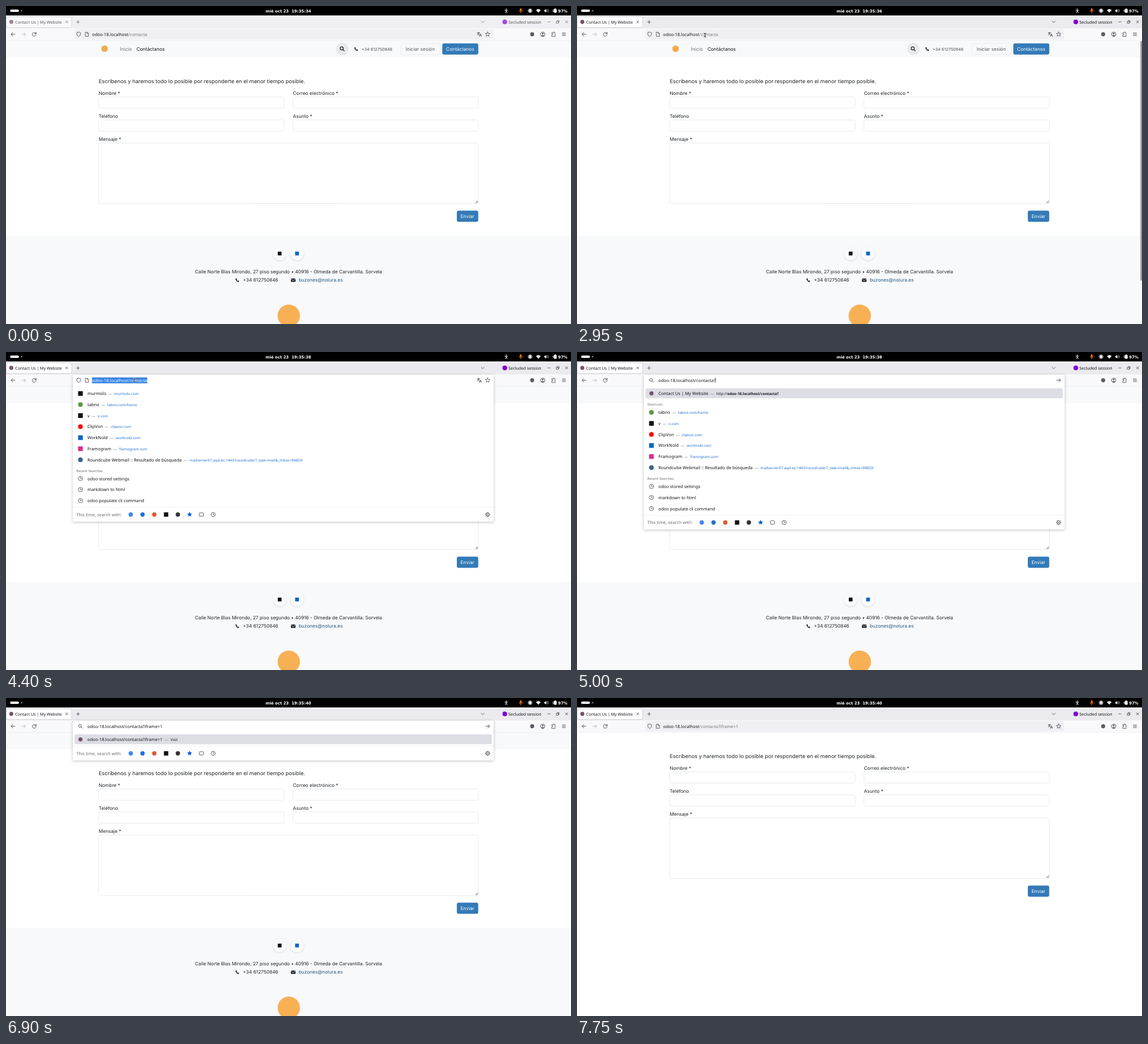
Recreate the animation shown at these times as an HTML page with a canvas. Size 960 px wide and 540 px high, loop 8000 ms.

```html
<!DOCTYPE html>
<html lang="es">
<head>
<meta charset="utf-8">
<title>Contact Us | My Website</title>
<style>
html, body { margin: 0; width: 960px; height: 540px; overflow: hidden; background: #fff; }
canvas { display: block; width: 960px; height: 540px; }
</style>
</head>
<body>
<canvas id="stage"></canvas>
<script>
const LOOP = 8000, W = 960, H = 540;
const cv = document.getElementById('stage');
const scale = Math.max(1, window.devicePixelRatio || 1);
cv.width = W * scale;
cv.height = H * scale;
const c = cv.getContext('2d');

const WEB = 'Inter, sans-serif', UI = '"Noto Sans", sans-serif', BAR = '"DejaVu Sans", sans-serif';
const INK = '#15141a', ICON = '#45444e', BODY = '#212529', BLUE = '#337ab7', LINK = '#1f70cf';
const HOST = 'odoo-18.localhost', PATH = '/contacta', QUERY = '?iframe=1';
const PHONE = '+34 612750846';

// times of the steps
const FOCUS = 950, OPEN = 3450, SELECT = 3550, CLOSE = 4550, TYPE = 5000, SHRINK = 5150, ENTER = 7250, LOADED = 7450;
const KEYS = [TYPE, SHRINK, 5450, 5650, 5800, 6000, 6150, 6400, 6750];
const MOVES = [[950, 958, 300], [1650, 199.5, 37], [1850, 199.5, 37], [2250, 211, 47],
  [2700, 211, 47], [2950, 217.5, 49.5], [3100, 218, 48.2]];

const SITES = [
  ['murmolo', 'murmolo.com', '#111', 1], ['tabno', 'tabno.com/home', '#5d9948'],
  ['v', 'x.com', '#111', 1], ['ClipVon', 'clipvon.com', '#f00'],
  ['WorkNold', 'worknold.com', '#0a66c2', 1], ['Framogram', 'framogram.com', '#d6308f', 1],
  ['Roundcube Webmail :: Resultado de búsqueda',
    'mailserver07.aspl.es:1443/roundcube/?_task=mail&_mbox=INBOX', '#37648a']];
const RECENT = ['odoo stored settings', 'markdown to html', 'odoo populate cli command'];

function text(s, x, y, size, color = INK, font = UI, weight = 400, align = 'left') {
  c.font = `${weight} ${size}px ${font}`;
  c.textAlign = align;
  c.fillStyle = color;
  c.fillText(s, x, y);
  return x + c.measureText(s).width;
}
function rect(x, y, w, h, color) {
  c.fillStyle = color;
  c.fillRect(x, y, w, h);
}
function box(x, y, w, h, r, fill, line, lw = 0.6) {
  c.beginPath();
  c.roundRect(x, y, w, h, r);
  if (fill) { c.fillStyle = fill; c.fill(); }
  if (line) { c.strokeStyle = line; c.lineWidth = lw; c.stroke(); }
}
function disc(x, y, r, fill, line, lw = 0.9) {
  c.beginPath();
  c.arc(x, y, r, 0, 7);
  if (fill) { c.fillStyle = fill; c.fill(); }
  if (line) { c.strokeStyle = line; c.lineWidth = lw; c.stroke(); }
}
// strokes or fills an SVG path around a point
function icon(x, y, d, color = ICON, lw = 0.9, fill = false) {
  c.save();
  c.translate(x, y);
  const p = new Path2D(d);
  c.lineCap = c.lineJoin = 'round';
  c.lineWidth = lw;
  c.strokeStyle = c.fillStyle = color;
  if (fill) c.fill(p); else c.stroke(p);
  c.restore();
}
function shadow(color, blur, dy, draw) {
  c.save();
  c.shadowColor = color;
  c.shadowBlur = blur * scale;
  c.shadowOffsetY = dy * scale;
  draw();
  c.restore();
}
const mark = (x, y, color, square, r = 4) =>
  square ? rect(x - r, y - r, 2 * r, 2 * r, color) : disc(x, y, r, color);
const lens = (x, y, k, color, lw) => {
  disc(x - 0.7 * k, y - 0.7 * k, 2.4 * k, null, color, lw);
  icon(x, y, `M${k} ${k}L${3.2 * k} ${3.2 * k}`, color, lw);
};
const clock = (x, y) => {
  disc(x, y, 3.6, null, ICON, 0.8);
  icon(x, y, 'M0 -2V0.2H1.6', ICON, 0.8);
};
const star = (x, y, r, color, fill) => {
  let d = '';
  for (let i = 0; i < 10; i++) {
    const a = i * Math.PI / 5 - Math.PI / 2, q = i % 2 ? r * 0.48 : r;
    d += (i ? 'L' : 'M') + Math.cos(a) * q + ' ' + Math.sin(a) * q;
  }
  icon(x, y, d + 'Z', color, 0.8, fill);
};
const gear = (x, y, r, color) => {
  disc(x, y, r * 0.72, null, color, 0.9);
  disc(x, y, r * 0.25, null, color, 0.7);
  for (let i = 0; i < 8; i++) {
    const a = i * Math.PI / 4, u = Math.cos(a), v = Math.sin(a);
    icon(x, y, `M${u * r * 0.8} ${v * r * 0.8}L${u * r} ${v * r}`, color, 0.9);
  }
};
const handset = (x, y) =>
  icon(x, y, 'M-3 -2.4L-1.6 -3.2L-.5 -1.2L-1.2 -.5Q-.6 .7 .5 1.2L1.2 .5L3.2 1.6L2.4 3Q.8 3.6 -1.4 1.4Q-3.6 -.8 -3 -2.4Z', BODY, 1, true);

function topBar(t) {
  rect(0, 0, W, 16, '#000');
  box(7, 6, 15, 4, 2, '#fff');
  disc(26.5, 8, 1.3, '#8a8a8a');
  const sec = 34 + Math.floor((t + 600) / 1250);
  text('mié oct 23  19:35:' + sec, 441, 10.5, 6.7, '#fff', BAR, 700);
  disc(850, 5.4, 0.9, '#fff');
  icon(850, 8, 'M-2.4 -.9L0 -.4L2.4 -.9M0 -.4V1M-1.4 3.4L0 .8L1.4 3.4', '#fff', 0.9);
  box(873.2, 4, 2.8, 5, 1.4, '#ff7800');
  icon(874.6, 8, 'M-2.4 -.5Q-2.4 2.2 0 2.2Q2.4 2.2 2.4 -.5M0 2.2V3.8', '#ff7800', 0.8);
  disc(879, 8, 0.6, '#ff7800');
  disc(890.5, 8, 1.9, '#fff');
  gear(890.5, 8, 3.7, '#fff');
  icon(904.5, 8, 'M0 3.3L-4 -1Q0 -4.6 4 -1Z', '#fff', 1, true);
  icon(918, 8, 'M-3.5 -1.2H-2L0 -3V3L-2 1.2H-3.5Z', '#fff', 1, true);
  icon(918, 8, 'M1.3 -1.4Q2.2 0 1.3 1.4M2.8 -2.6Q4.5 0 2.8 2.6', '#bbb', 0.8);
  box(931, 5, 4.6, 6.6, 0.8, '#fff');
  rect(932.3, 4.2, 2, 1, '#fff');
  icon(930, 8, 'M0 -2L-1 .3H.6L-.4 2.4', '#fff', 0.8);
  text('97%', 938, 10.5, 6.7, '#fff', BAR, 700);
}

function tabStrip(active) {
  rect(0, 16, W, 22, active ? '#ebebef' : '#f0f0f4');
  shadow('rgba(0,0,0,.3)', 2, 0, () => box(1, 18.5, 110, 17.5, 2, active ? '#fff' : '#f9f9fb'));
  c.globalAlpha = active ? 1 : 0.7;
  disc(9, 27, 3.4, '#75526a');
  text('Contact Us | My Website', 15.6, 29.7, 6.85);
  const x = 'M-1.9 -1.9L1.9 1.9M1.9 -1.9L-1.9 1.9';
  icon(103.2, 27, x, ICON, 0.8);
  icon(122.4, 27.2, 'M-2.8 0H2.8M0 -2.8V2.8', ICON, 0.8);
  icon(810, 27, 'M-2.7 -1.2L0 1.4L2.7 -1.2', ICON, 0.8);
  disc(847.5, 27, 4, '#8000d7');
  text('Secluded session', 853.5, 29.5, 7);
  icon(922.5, 27, 'M-2.2 0H2.2', ICON, 0.8);
  icon(937.5, 27, 'M-2.2 -.9H1V2.3H-2.2ZM-1 -.9V-2.2H2.3V1H1', ICON, 0.8);
  icon(952.5, 27, x, ICON, 0.9);
  c.globalAlpha = 1;
}

function toolbar() {
  rect(0, 38, W, 20.5, '#f9f9fb');
  rect(0, 58, W, 0.5, '#e4e4e8');
  const back = 'M3.3 0H-3.3M-.4 -2.9L-3.3 0L-.4 2.9';
  icon(12, 48, back);
  icon(30, 48, 'M-3.3 0H3.3M.4 -2.9L3.3 0L.4 2.9', '#b9b9c0');
  icon(48, 48, 'M2.9 -1.2A3.2 3.2 0 1 0 3.1 .9M3.2 -3.4V-.9H.8');
  disc(894, 48, 3.4, '#5b5b66');
  disc(912, 48, 3.7, null, ICON);
  disc(912, 47, 1.3, ICON);
  icon(912, 48, 'M-2.2 2.4Q0 .4 2.2 2.4Q0 3.8 -2.2 2.4Z', ICON, 1, true);
  icon(930, 48, 'M-2.8 3.4V.9H-1.7A1 1 0 0 0 -1.7 -1.1H-2.8V-2.4H-.3V-3A1 1 0 0 1 1.7 -3V-2.4H3V3.4Z', ICON, 0.8);
  icon(948, 48, 'M-2.8 -2.2H2.8M-2.8 0H2.8M-2.8 2.2H2.8', ICON, 0.8);
}

function siteIcons() {
  icon(123.5, 48, 'M0 -3.7L3.1 -2.6V-.2Q3 2.5 0 3.8Q-3 2.5 -3.1 -.2V-2.6Z', ICON, 0.8);
  icon(137.5, 48, 'M-2.4 -3.4H.6L2.6 -1.4V3.4H-2.4ZM.5 -3.3V-1.3H2.5', ICON, 0.8);
  icon(804, 48, 'M-3.5 -2.4H1M-1.3 -3.6V-2.4M.2 -2.4Q-.6 .3 -3.3 1.2M-2.5 -1.6Q-1.5 .3 0 .8M.2 3.6L2.1 -.8L4 3.6M.9 2.2H3.4', ICON, 0.8);
  star(818.4, 48, 4, ICON, false);
}

function address(query) {
  box(116.5, 39.5, 711, 17, 2, '#f0f0f4');
  siteIcons();
  const x = text(HOST, 146.2, 50.7, 7.33);
  text(PATH + query, x, 50.7, 7.33, '#75757d');
}

function panel(bottom) {
  shadow('rgba(30,30,40,.28)', 5, 1, () => box(113.5, 38.5, 715, bottom - 38.5, 2, '#fff'));
}
function detail(x, s, color) {
  x = text('—', x + 3.6, 0, 6.23, '#6b6b74');
  return text(s, x + 3.7, 0, 6.23, color);
}
function row(y, title, url, color = LINK) {
  c.save();
  c.translate(0, y + 2.7);
  const x = text(title, 138.3, 0, 7.33);
  if (url) detail(x, url, color);
  c.restore();
}
function siteRow(s, y) {
  mark(126.5, y, s[2], s[3]);
  row(y, s[0], s[1]);
}
function recent(y) {
  text('Recent Searches', 119.5, y + 2, 5.85, '#6b6b74');
  RECENT.forEach((s, i) => {
    const ry = y + 13.4 + i * 18.75;
    clock(126.5, ry);
    row(ry, s);
  });
}
function engines(bottom) {
  const y = bottom - 12;
  rect(113.5, bottom - 24.7, 715, 0.5, '#e6e6ea');
  text('This time, search with:', 119.5, y + 2.7, 7.33, '#6b6b74');
  ['#4285f4', '#1a73d8', '#de5833', '#111', '#333'].forEach((k, i) => mark(212 + i * 20, y, k, i == 3, 3.7));
  star(312, y, 4.4, '#0060df', true);
  box(328.4, y - 2.9, 7.2, 5.8, 1, null, ICON, 0.8);
  clock(352, y);
  gear(818.3, y, 4, ICON);
}
function firstRow() {
  box(116.5, 61.7, 709, 16.8, 2, '#dddde4');
  disc(126.5, 70.2, 3.5, '#75526a');
}

// address field while it has the caret
function editing(t) {
  const typed = KEYS.filter(k => k <= t).length;
  const url = HOST + PATH + QUERY.slice(0, typed);
  if (t < CLOSE) {
    panel(288);
    SITES.forEach((s, i) => siteRow(s, 70.5 + i * 18.75));
    recent(201.5);
    engines(288);
  } else if (t < TYPE) {
    panel(57);
  } else if (t < SHRINK) {
    panel(301.5);
    firstRow();
    row(70.2, 'Contact Us | My Website');
    c.font = `400 7.33px ${UI}`;
    let x = 138.3 + c.measureText('Contact Us | My Website').width;
    x = text('—', x + 3.6, 72.9, 6.23, '#6b6b74');
    x = text('http://', x + 3.7, 72.9, 6.23);
    text(url, x, 72.9, 6.23, INK, UI, 700);
    text('Shortcuts', 119.5, 90.7, 5.85, '#6b6b74');
    SITES.slice(1).forEach((s, i) => siteRow(s, 102.5 + i * 18.75));
    recent(214.9);
    engines(301.5);
  } else {
    panel(106);
    firstRow();
    row(70.2, url, 'Visit', INK);
    engines(106);
  }
  if (t < TYPE) {
    siteIcons();
    const sel = t >= SELECT && t < CLOSE;
    c.font = `400 7.33px ${UI}`;
    if (sel) rect(146.2, 43.2, c.measureText(url).width, 10, '#3584e4');
    const x = text(url, 146.2, 50.7, 7.33, sel ? '#fff' : INK);
    if (t >= CLOSE) rect(x, 43.5, 0.6, 9, INK);
  } else {
    lens(126.5, 48, 1, ICON, 0.9);
    icon(818.3, 48, 'M-3.3 0H3.3M.4 -2.9L3.3 0L.4 2.9', ICON, 0.9);
    const x = text(url, 138.3, 50.7, 7.33);
    if (t < 6850) rect(x, 43.5, 0.6, 9, INK);
  }
}

function header() {
  rect(0, 58.5, W, 28.7, '#f8f9fa');
  disc(167.5, 72.5, 5.5, '#f2a950');
  text('Inicio', 193.6, 75.9, 8, '#6c6e71', WEB);
  text('Contáctanos', 221.7, 75.9, 8, '#101112', WEB);
  disc(571.5, 73, 10.5, '#e8e9eb');
  lens(571.2, 72.7, 1.1, BODY, 1.2);
  handset(595, 73);
  text(PHONE, 604.2, 75.6, 7, '#4a4e53', WEB);
  box(671.3, 63.7, 66.2, 18.8, 3, '#f8f9fa', '#dfe2e6');
  text('Iniciar sesión', 679, 75.9, 8, '#54585d', WEB);
  box(741.3, 63.5, 61.2, 19, 3, BLUE);
  text('Contáctanos', 747.8, 75.9, 8, '#fff', WEB);
}

function form(dy) {
  c.save();
  c.translate(0, dy);
  text('Escríbenos y haremos todo lo posible por responderte en el menor tiempo posible.', 157.4, 131.2, 9, BODY, WEB);
  [['Nombre *', 157.5, 154.5], ['Correo electrónico *', 487.5, 154.5],
    ['Teléfono', 157.5, 193.5], ['Asunto *', 487.5, 193.5]].forEach(([s, x, y]) => {
    text(s, x, y - 3.1, 8, BODY, WEB);
    box(x, y, 315, 19, 3, '#fff', '#d9dde1');
  });
  text('Mensaje *', 157.5, 229.4, 8, BODY, WEB);
  box(157.5, 232.8, 645, 102.6, 3, '#fff', '#d9dde1');
  icon(801.6, 334.6, 'M0 -5V0H-5Z', '#b4b4b4', 1, true);
  box(766, 347.5, 36.4, 19, 3, BLUE);
  text('Enviar', 772.3, 359.9, 8, '#fff', WEB);
  c.restore();
}

function footer() {
  rect(0, 390.7, W, 150, '#f8f9fa');
  [[465, '#111'], [494.5, '#0a66c2']].forEach(([x, k]) => {
    shadow('rgba(0,0,0,.12)', 3, 1, () => disc(x, 420.3, 11.5, '#f9fafb'));
    mark(x, 420.3, k, true, 3.2);
  });
  text('Calle Norte Blas Mirondo, 27 piso segundo • 40916 - Olmeda de Carvantilla. Sorvela', 480, 454.3, 8, BODY, WEB, 400, 'center');
  handset(393, 465.5);
  text(PHONE, 402.6, 468.3, 8, BODY, WEB);
  box(484, 462.8, 8, 5.8, 1, BODY);
  icon(488, 465.2, 'M-3.8 -1.4L0 1.2L3.8 -1.4', '#f8f9fa', 0.7);
  text('buzones@nolura.es', 497.2, 468.3, 8, '#24587f', WEB);
  disc(480.5, 526, 19, '#f8b055');
}

function scrollbar(t) {
  const a = t < FOCUS ? 0 : Math.min(1, Math.max(0, (3220 - t) / 220));
  if (!a) return;
  c.globalAlpha = a;
  box(957.7, 59.5, 1.7, 407, 0.8, '#6b6b70');
  c.globalAlpha = 1;
}

function pointer(t) {
  if (t < FOCUS || t >= CLOSE) return;
  let i = MOVES.length - 1;
  while (MOVES[i][0] > t) i--;
  const a = MOVES[i], b = MOVES[i + 1] || a;
  const u = b === a ? 0 : (t - a[0]) / (b[0] - a[0]), k = u * u * (3 - 2 * u);
  const x = a[1] + (b[1] - a[1]) * k, y = a[2] + (b[2] - a[2]) * k;
  if (t > 2000) {
    const beam = 'M-1.6 -3.3Q0 -3.3 0 -2.4V2.4Q0 3.3 -1.6 3.3M1.6 -3.3Q0 -3.3 0 -2.4M0 2.4Q0 3.3 1.6 3.3';
    icon(x, y, beam, '#fff', 1.8);
    icon(x, y, beam, '#000', 0.9);
  } else {
    const arrow = 'M0 0V7.4L1.8 5.8L3 8.4L4.2 7.9L3 5.3H5.3Z';
    icon(x, y, arrow, '#fff', 1.2);
    icon(x, y, arrow, '#111', 1, true);
  }
}

function draw(t) {
  c.setTransform(scale, 0, 0, scale, 0, 0);
  c.textRendering = 'geometricPrecision';
  rect(0, 0, W, H, '#fff');
  if (t < LOADED) {
    header();
    form(0);
    footer();
    scrollbar(t);
  } else {
    form(-29);
  }
  topBar(t);
  tabStrip(t >= FOCUS);
  toolbar();
  if (t >= OPEN && t < ENTER) editing(t);
  else address(t < ENTER ? '' : QUERY);
  pointer(t);
}

const start = performance.now();
function frame() {
  draw((performance.now() - start) % LOOP);
  requestAnimationFrame(frame);
}
frame();
</script>
</body>
</html>
```
